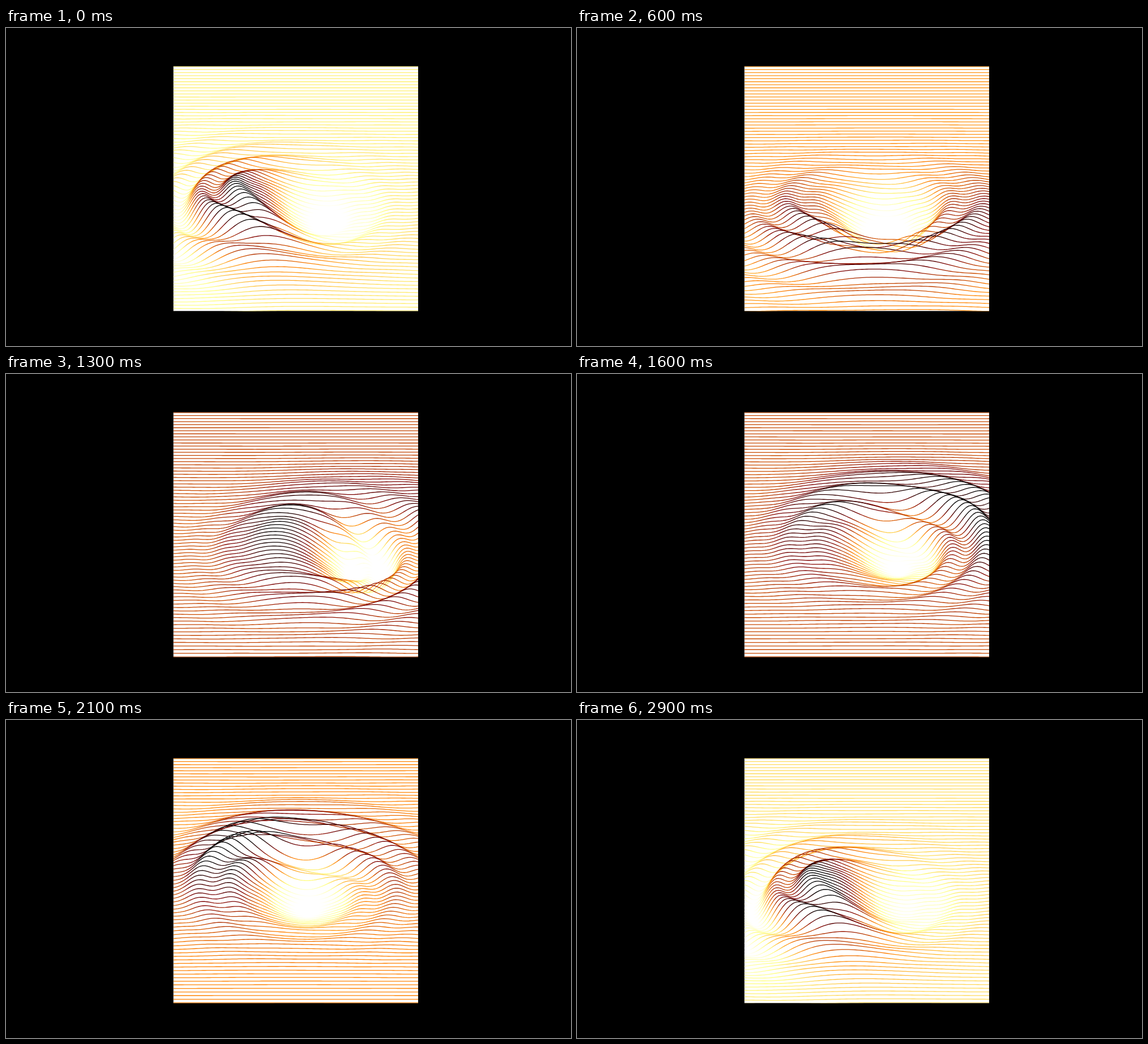
Animation, 998 px wide and 561 px high, one loop 3000 ms. Source, as an HTML page with a canvas:

```html
<!DOCTYPE html>
<html lang="en">
<head>
<meta charset="utf-8">
<title>Rippling lines</title>
<style>
  html, body { margin: 0; width: 100%; height: 100%; overflow: hidden; background: #000; }
  canvas { display: block; width: 998px; height: 561px; }
</style>
</head>
<body>
<canvas id="stage" width="998" height="561"></canvas>
<script>
const ctx = document.getElementById('stage').getContext('2d');
const LOOP = 3000, STEP = 100, TAU = Math.PI * 2;
const BOX = { x: 295.5, y: 67.5, w: 432.5, h: 432 };
const LINES = 75, CENTRE = 30, MID_X = 512, SAMPLES = 108;
const ORBIT = 110, REACH = 185, SWELL = 50, RIPPLE = 15, SPAN = 66;

// Colour of the flat plane over the loop: [time, level].
const levels = [[0, .72], [600, .54], [1000, .25], [1300, .38], [1900, .4], [2400, .67], [2900, .68], [3000, .72]];

function levelAt(t) {
  const i = levels.findIndex(k => k[0] > t);
  const [t0, a] = levels[i - 1], [t1, b] = levels[i];
  return a + (b - a) * (t - t0) / (t1 - t0);
}

// Strength falls off around a point that circles the middle.
function reach(x, y, angle) {
  const dx = x - ORBIT * Math.cos(angle), dy = y - ORBIT * Math.sin(angle);
  return Math.exp(-(dx * dx + dy * dy) / (REACH * REACH));
}

// A wide hollow with a raised rim, swaying sideways, plus fine rings running outwards.
function height(x, y, t) {
  const turn = TAU * t / LOOP, angle = 2.46 - turn;
  const hollowX = 75 - 62 * Math.cos(2 * turn - 1.68);
  const rim = Math.hypot((x - hollowX) / 95, y / 150);
  const swell = -SWELL * reach(x, y, angle) * Math.cos(rim * TAU / 4);

  const r = Math.hypot(x, y);
  const lag = .44 * Math.min(r / 200, 1.5);
  const fade = 1 - Math.exp(-((r / 130) ** 4));
  const rings = Math.cos(TAU * ((r - 38) / 67 - 3 * t / LOOP));
  return swell + RIPPLE * reach(x, y, angle + lag) * fade * rings;
}

function heat(v) {
  const c = k => Math.round(255 * Math.min(1, Math.max(0, 2 * v - k)));
  return `rgb(${c(0)},${c(.5)},${c(1)})`;
}

function drawLine(n, t, level) {
  // Slight perspective: nearer lines lie further apart.
  const y0 = 4757 / (1 + n * .001346) - 4258;
  const scale = (y0 + 4258) / 4572;
  const y = (CENTRE - n) * 12.96;
  const shade = ctx.createLinearGradient(BOX.x, 0, BOX.x + BOX.w, 0);
  ctx.beginPath();
  for (let i = 0; i <= SAMPLES; i++) {
    const px = BOX.x + BOX.w * i / SAMPLES;
    const z = height((px - MID_X) / scale, y, t);
    ctx.lineTo(px, y0 - z);
    if (i % 2 === 0) shade.addColorStop(i / SAMPLES, heat(level - z / SPAN));
  }
  ctx.strokeStyle = shade;
  ctx.stroke();
}

function draw(t) {
  ctx.fillStyle = '#000';
  ctx.fillRect(0, 0, 998, 561);
  ctx.save();
  ctx.beginPath();
  ctx.rect(BOX.x, BOX.y, BOX.w, BOX.h);
  ctx.clip();
  ctx.fillStyle = '#fff';
  ctx.fillRect(BOX.x, BOX.y, BOX.w, BOX.h);
  ctx.lineWidth = 1.3;
  ctx.lineJoin = 'round';
  const level = levelAt(t);
  for (let n = LINES - 1; n >= 0; n--) drawLine(n, t, level);
  ctx.restore();
}

const start = performance.now();
let shown = -1;
function tick() {
  const t = Math.floor(((performance.now() - start) % LOOP) / STEP) * STEP;
  if (t !== shown) draw(shown = t);
  requestAnimationFrame(tick);
}
tick();
</script>
</body>
</html>
```
